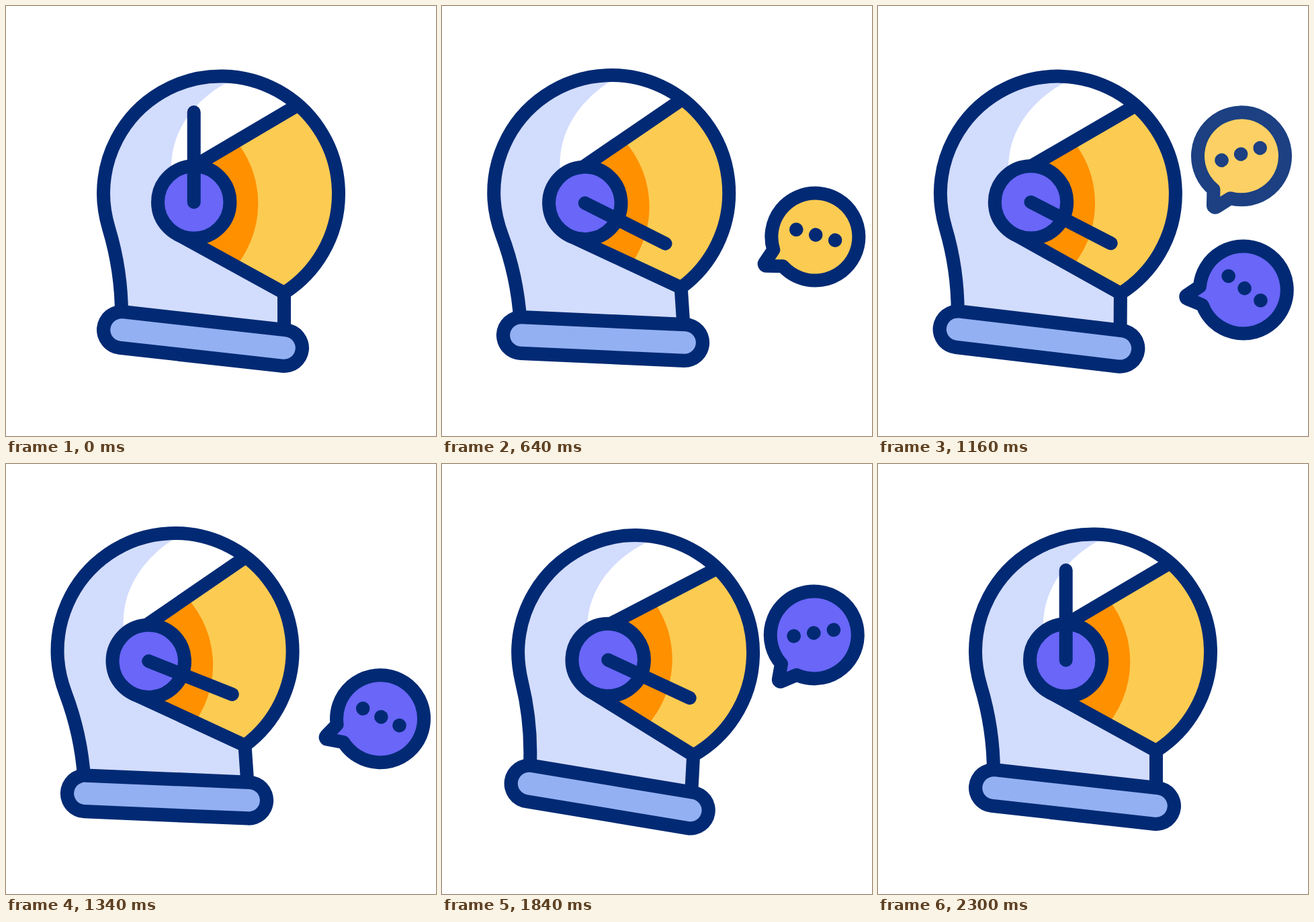
These frames come from a looping animation (640 px wide and 640 px high, 2400 ms). An HTML page:

```html
<!DOCTYPE html>
<html lang="en">
<head>
<meta charset="utf-8">
<title>Talking space helmet</title>
<style>
html, body { margin: 0; width: 100%; height: 100%; overflow: hidden; background: #fff; }
svg { display: block; width: 100vw; height: 100vh; }
.line { fill: none; stroke: #022a74; stroke-width: 20; stroke-linejoin: round; }
.round { stroke-linecap: round; }
</style>
</head>
<body>
<svg viewBox="0 0 640 640">
  <defs>
    <clipPath id="visor">
      <path d="M285 236 L434 148 A175 175 0 0 1 414 427 L254 339 Z"/>
    </clipPath>
    <g id="bubble">
      <path class="line" style="fill:inherit" d="M-35 54.8 A65 65 0 1 0 -54.8 35 L-62.4 57.2 A3 3 0 0 0 -58.7 60.9 Z"/>
      <g fill="#022a74">
        <circle cx="-30" cy="-3" r="10.3"/><circle cy="-3" r="10.3"/><circle cx="30" cy="-3" r="10.3"/>
      </g>
    </g>
  </defs>
  <g id="helmet">
    <path fill="#d2dcfd" d="M172 450 C172 405 163 364 153 331 C148 314 145 297 145 279 A175 175 0 1 1 414 427 V500 L172 480 Z"/>
    <path fill="#fff" d="M345 106 C290 130 246 178 246 240 L285 236 L434 148 A175 175 0 0 0 345 106 Z"/>
    <g clip-path="url(#visor)">
      <rect x="200" y="90" width="310" height="350" fill="#fccb52"/>
      <circle cx="227" cy="294" r="148.3" fill="#ff9000"/>
    </g>
    <path class="line" d="M172 460 C172 405 163 364 153 331 C148 314 145 297 145 279 A175 175 0 1 1 414 427 V485"/>
    <path class="line" d="M278 239.6 L434 147.6 M253.9 339.1 L414 427"/>
    <path class="line round" style="stroke-width:74" d="M172 482 L414 509"/>
    <path class="line round" style="stroke-width:33.5;stroke:#93b0f2" d="M172 482 L414 509"/>
    <circle class="line" style="fill:#6966f8" cx="279.7" cy="292" r="53.7"/>
    <path id="antenna" class="line round" d="M279.7 292 V158"/>
  </g>
  <use id="first" href="#bubble" fill="#fccb52"/>
  <use id="second" href="#bubble" fill="#6966f8"/>
</svg>
<script>
const LOOP = 2400;
const el = id => document.getElementById(id);
const clamp = v => Math.max(0, Math.min(1, v));
const ease = (t, a, b) => (1 - Math.cos(Math.PI * clamp((t - a) / (b - a)))) / 2;

// The helmet nods between these angles, one every 340 ms.
const nods = [0, -3.9, 2.9, -4, 4.8, 0];
const tilt = t => nods.slice(1).reduce(
  (sum, v, i) => sum + (v - nods[i]) * ease(t, 340 * (i + 1), 340 * (i + 2)), 0);

const slide = t => -53.5 * (ease(t, 0, 570) - ease(t, 1680, 2240));
const swing = t => (125 - 0.007 * t) * (ease(t, 0, 464) - ease(t, 1830, 2270));

// A bubble climbs an arc at steady speed, slows at the top and fades.
function drawBubble(node, t, peak, depth) {
  let u = Math.max(70, t);
  if (u > 1000) u = 1000 + 180 * Math.tanh((u - 1000) / 180);
  const a = (39.4 - 0.0547 * u) * Math.PI / 180;
  const x = peak - depth * (1 - Math.cos(a));
  const y = 323.6 + 264 * Math.sin(a);
  const turn = Math.min(45, 58.6 - 0.0676 * u);
  node.setAttribute("opacity", clamp(Math.min(t - 20, 1340 - t) / 200));
  node.setAttribute("transform", `translate(${x} ${y}) rotate(${turn})`);
}

function draw(t) {
  el("helmet").setAttribute("transform",
    `translate(${slide(t)} 0) rotate(${tilt(t)} 293 495.5)`);
  el("antenna").setAttribute("transform", `rotate(${swing(t)} 279.7 292)`);
  drawBubble(el("first"), t, 556, 200);
  drawBubble(el("second"), t - 843, 563, 264);
}

function tick() {
  draw(performance.now() % LOOP);
  requestAnimationFrame(tick);
}
tick();
</script>
</body>
</html>
```
